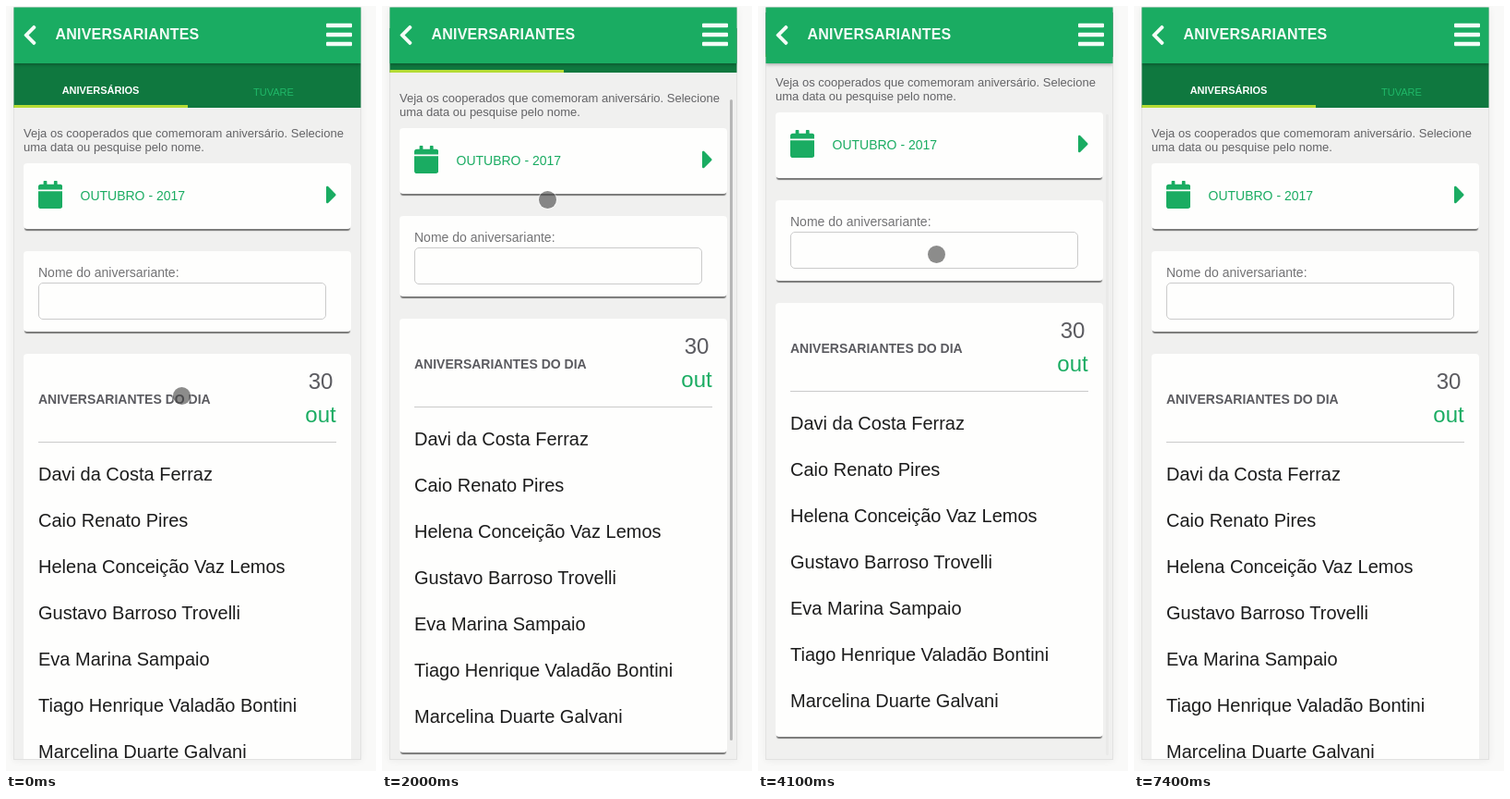
These frames come from a looping animation (401x827 px, 8000 ms). An HTML page:

```html
<!DOCTYPE html>
<html lang="pt-BR">
<head>
<meta charset="utf-8">
<title>Aniversariantes</title>
<style>
  html, body { margin: 0; width: 100%; height: 100%; overflow: hidden; background: #f9f9f8; }
  body { position: relative; font: 14px/20px "Liberation Sans", Arial, sans-serif; }
  div, svg { position: absolute; box-sizing: border-box; white-space: nowrap; }
  #phone { left: 8px; top: 1px; width: 377px; height: 814px; background: #f0f0ef;
    border: 1px solid #e2e2e1; box-shadow: 0 1px 8px rgba(0,0,0,.06); }
  #view { inset: 0; clip-path: inset(1.5px 16.5px 13px 8.5px); }
  #page { left: 0; top: 0; width: 401px; height: 870px; }
  #head { left: 8px; top: 1px; width: 377px; height: 61px; background: #1aac62;
    box-shadow: 0 1px 4px rgba(0,0,0,.35); }
  #title { left: 53.5px; top: 21px; font-size: 16px; font-weight: bold; letter-spacing: .2px; color: #f4fcf7; }
  #tabs { left: 8px; top: 62px; width: 377px; height: 48px; background: #0f783f; }
  #mark { left: 8px; top: 106.5px; width: 189px; height: 3px; background: #b5dc35; }
  .tab { width: 188px; text-align: center; font-size: 11px; }
  .card { left: 19px; width: 355px; background: #fefefd; border-radius: 4px;
    box-shadow: 0 3px 1px -1px rgba(0,0,0,.5); }
  .date { left: 311.5px; width: 59px; text-align: center; font-size: 24px; line-height: 36px; }
  .green { color: #1aac62; fill: #1aac62; }
  .white { fill: #f4fcf7; }
  .name { left: 35px; font-size: 20px; line-height: 50px; color: #1c1c1c; }
  #field { left: 35px; top: 299px; width: 312px; height: 40px; border: 1px solid #cbcbcb; border-radius: 5px; }
  #field.on { border-color: #d8b983; border-radius: 2px; outline: 2px solid #d8b983; outline-offset: -1px; }
  #caret { left: 1px; top: 7px; width: 1px; height: 24px; background: #222; }
  #bar { left: 377px; top: 66px; width: 3px; height: 693px; border-radius: 2px; background: #808080; }
  #dot { left: -9px; top: -9px; width: 19px; height: 19px; border-radius: 50%;
    background: rgba(70,70,70,.62); box-shadow: 0 0 0 1px rgba(255,255,255,.5); }
</style>
</head>
<body>
<div id="phone"></div>
<div id="view">
  <div id="page">
    <div id="tabs"></div>
    <div id="mark"></div>
    <div class="tab" style="left:8.5px;top:81px;color:#fff;font-weight:bold">ANIVERSÁRIOS</div>
    <div class="tab" style="left:196px;top:83px;color:#20b969">TUVARE</div>

    <div style="left:19px;top:130px;font-size:13px;line-height:15px;color:#636366">Veja os cooperados que comemoram aniversário. Selecione<br>uma data ou pesquise pelo nome.</div>

    <div class="card" style="top:170px;height:71px"></div>
    <div class="green" style="left:80.5px;top:195px">OUTUBRO - 2017</div>
    <svg class="green" style="left:35px;top:189px" width="26.250" height="30" viewBox="0 0 448 512">
      <path d="M0 192h448v272q0 48-48 48H48q-48 0-48-48zM0 160v-48q0-48 48-48h48V12q0-12 12-12h40q12 0 12 12v52h128V12q0-12 12-12h40q12 0 12 12v52h48q48 0 48 48v48z"/>
    </svg>
    <svg class="green" style="left:347px;top:188px" width="12" height="32" viewBox="0 0 192 512">
      <path d="M0 385V127c0-18 22-27 34-14l129 129c8 8 8 20 0 28L34 399c-12 12-34 3-34-14z"/>
    </svg>

    <div class="card" style="top:265px;height:87px"></div>
    <div style="left:35px;top:278px;color:#737375">Nome do aniversariante:</div>
    <div id="field"><div id="caret"></div></div>

    <div class="card" style="top:376px;height:469px"></div>
    <div style="left:35px;top:415px;font-weight:bold;color:#5b5b60">ANIVERSARIANTES DO DIA</div>
    <div class="date" style="top:388px;color:#5b5b60">30</div>
    <div class="date green" style="top:424px">out</div>
    <div style="left:35px;top:471px;width:323px;height:1px;background:#cacaca"></div>
  </div>
  <div id="head"></div>
  <div id="title">ANIVERSARIANTES</div>
  <svg class="white" style="left:17.5px;top:18.5px" width="16" height="25" viewBox="0 0 320 512">
    <path d="M35 239L229 45q17-14 34 0l22 22q14 17 0 34L131 256l154 155q14 17 0 34l-22 22q-17 14-34 0L35 273q-14-17 0-34z"/>
  </svg>
  <svg class="white" style="left:347px;top:15px" width="28" height="32" viewBox="0 0 448 512">
    <rect id="line" y="60" width="448" height="72" rx="16"/>
    <use href="#line" y="160"/>
    <use href="#line" y="320"/>
  </svg>
  <div id="bar"></div>
</div>
<div id="dot"></div>
<script>
const $ = id => document.getElementById(id);
const LOOP = 8000, TICK = 100, TRAVEL = 55, ROW = 50;
const FOCUS = 4700, BLUR = 6700, EXIT = 7400;

const names = ['Davi da Costa Ferraz', 'Caio Renato Pires', 'Helena Conceição Vaz Lemos',
  'Gustavo Barroso Trovelli', 'Eva Marina Sampaio', 'Tiago Henrique Valadão Bontini', 'Marcelina Duarte Galvani'];
names.forEach((text, i) => {
  const row = document.createElement('div');
  row.className = 'name';
  row.style.top = 481 + ROW * i + 'px';
  row.textContent = text;
  $('page').append(row);
});

// Page drags, alternately up and down; the scrollbar fades after `hold`
const drags = [
  { start: 500, end: 800, hold: 1200 },
  { start: 1900, end: 2475, hold: 2900 },
  { start: 3500, end: 3900, hold: 3750 },
  { start: 5700, end: 6300, hold: 6400 },
];

// Pointer moves: start, end, x, y
const moves = [
  [500, 1600, 190, 173], [1700, 2300, 175, 221], [2600, 3200, 198, 413], [3500, 4100, 193, 268],
  [4600, 4900, 184, 306], [5000, 5400, 182, 398], [5500, 5700, 175, 188], [5700, 6300, 175, 244],
  [6400, 6900, 187, 103], [7000, EXIT, 71, 0],
];

const ramp = (t, a, b) => Math.min(1, Math.max(0, (t - a) / (b - a)));
const easeOut = p => 1 - (1 - p) ** 2;

const scrollAt = t => TRAVEL * drags.reduce((sum, d, i) =>
  sum + (i % 2 ? -1 : 1) * easeOut(ramp(t, d.start, d.end)), 0);

const barAt = t => Math.max(...drags.map(d =>
  t > d.start ? .5 * (1 - ramp(t, d.hold, d.hold + 400)) : 0));

const pointerAt = t => moves.reduce(([x, y], [start, end, toX, toY]) => {
  const p = easeOut(ramp(t, start, end));
  return [x + (toX - x) * p, y + (toY - y) * p];
}, [190, 421]);

function draw() {
  const t = Math.floor(performance.now() % LOOP / TICK) * TICK;
  const y = Math.round(scrollAt(t));
  const [px, py] = pointerAt(t).map(Math.round);
  const focus = t >= FOCUS && t < BLUR;
  const caret = focus && (t - FOCUS) % 1000 < 500;
  $('page').style.transform = `translateY(${-y}px)`;
  $('bar').style.transform = `translateY(${Math.round(y * .93)}px)`;
  $('bar').style.opacity = barAt(t);
  $('field').classList.toggle('on', focus);
  $('caret').style.visibility = caret ? 'visible' : 'hidden';
  $('dot').style.transform = `translate(${px}px, ${py}px)`;
  $('dot').style.visibility = t < EXIT ? 'visible' : 'hidden';
  requestAnimationFrame(draw);
}
draw();
</script>
</body>
</html>
```
